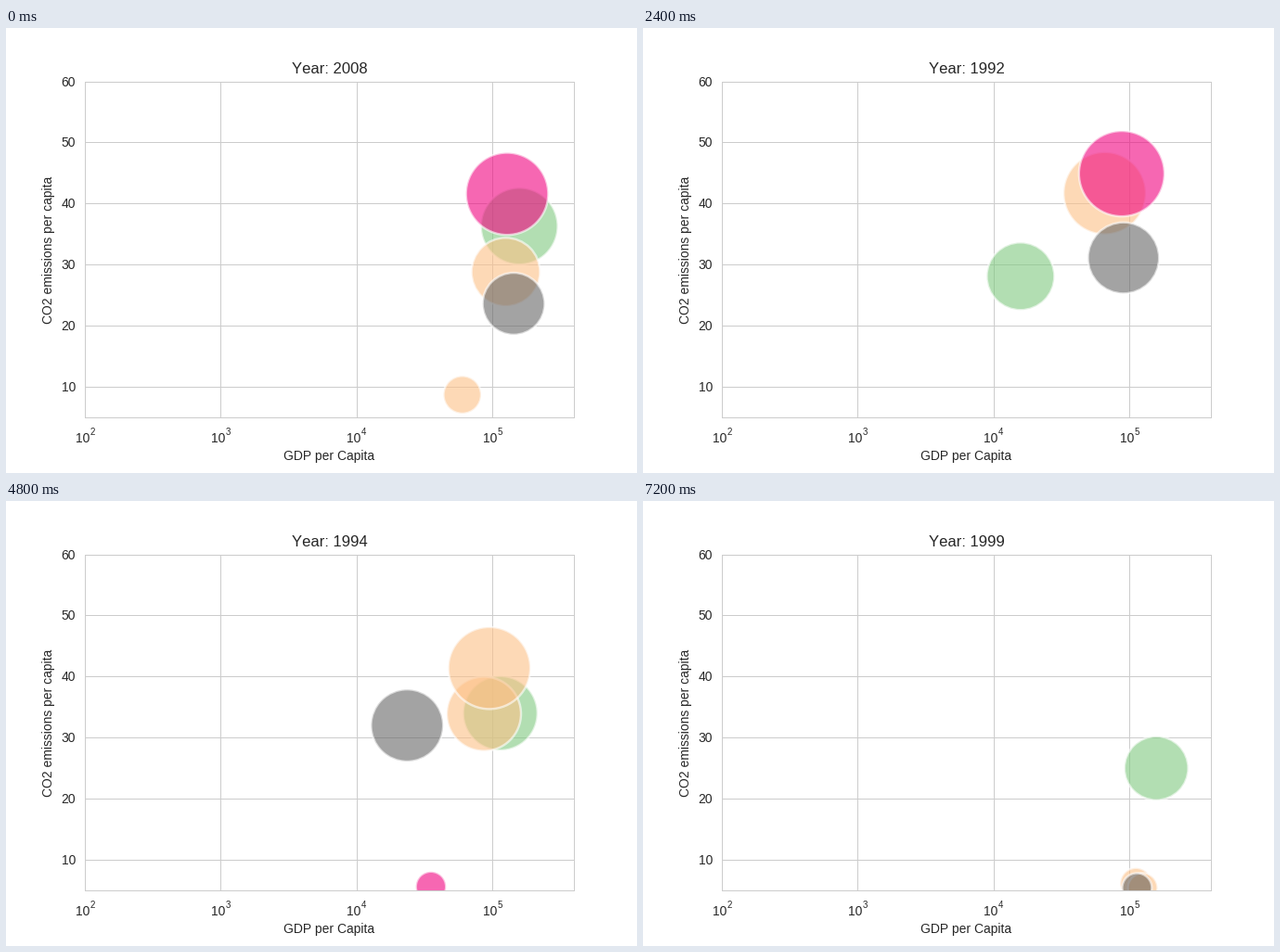
These frames come from a looping animation (680x480 px, 8000 ms). A matplotlib script:

```python
import math

import matplotlib.pyplot as plt
import numpy as np
from matplotlib.animation import FuncAnimation

W, H, DPI = 680, 480, 100
INK, GRID = "#262626", "#cccccc"
LINE = 72 / DPI  # one pixel in points

YEARS = [2008, 2009, *range(1993, 1989, -1), *range(1994, 2000, 2), 1999]

# CO2 per capita at the key steps; zero means the bubble is out of view
STEPS = [0, 2, 3, 4, 6, 7, 9]
CO2 = {
    "green": [36.3, 7.8, 28.1, 14.7, 34.0, 24.2, 25.0],
    "peach": [8.7, 42.0, 41.7, 39.9, 33.9, 37.9, 6.1],
    "apricot": [28.8, 6.2, 0, 23.7, 41.4, 24.9, 5.4],
    "pink": [41.6, 0, 44.9, 40.9, 5.6, 12.6, 0],
    "gray": [23.6, 31.4, 31.1, 16.0, 32.0, 5.5, 5.4],
}
COLORS = ["#7fc97f", "#fdc086", "#fdc086", "#f0027f", "#666666"]


def dip(i, center, width=0.5):
    return math.exp(-(((i - center) / width) ** 2))


def log_gdp(i):
    """GDP exponent per bubble: a base level with slumps."""
    return [
        5.2 - dip(i, 3, 1) - 0.14 * dip(i, 6),
        4.78 + 0.03 * i - 0.3 * dip(i, 2) - 2.44 * dip(i, 4) - 1.15 * dip(i, 7),
        5.1 - 0.93 * dip(i, 7, 0.7),
        5.11 - 1.04 * dip(i, 4.9, 1.4),
        5.16 - 0.8 * dip(i, 5.7, 2.3),
    ]


plt.rcParams["font.family"] = "Liberation Sans"
plt.rcParams["text.kerning_factor"] = 6

fig = plt.figure(figsize=(W / DPI, H / DPI), dpi=DPI, facecolor="white")
ax = fig.add_axes([0.125, 0.125, 0.775, 0.755])
ax.set_xlim(2, math.log10(4e5))
ax.set_ylim(5, 60)
ax.set_xticks(range(2, 6))
ax.set_yticks(range(10, 61, 10))
ax.tick_params(length=0, labelbottom=False, labelleft=False)
ax.set_axisbelow(True)
ax.grid(color=GRID, linewidth=LINE)
for spine in ax.spines.values():
    spine.set(color=GRID, linewidth=LINE)


def put(x, y, text, size=10, **kw):
    """Place text with its baseline at pixel (x, y), y measured downwards."""
    return fig.text(x / W, 1 - y / H, text, fontsize=size, color=INK,
                    va="baseline", **kw)


def to_px(x, y):
    px, py = ax.transData.transform((x, y))
    return px, H - py


for power in range(2, 6):
    x = to_px(power, 5)[0]
    put(x - 10.2, 447, "10", ha="left")
    put(x + 5.2, 439, str(power), 7, ha="left")
for value in range(10, 61, 10):
    put(75, to_px(2, value)[1] + 5, str(value), ha="right")

put(348.3, 466, "GDP per Capita", ha="center")
put(50.5, 239.3, "CO2 emissions per capita", rotation=90, ha="center",
    rotation_mode="anchor")
title = put(348.8, 49, "", 12, ha="center")

bubbles = ax.scatter([0] * 5, [0] * 5, s=[1] * 5, c=COLORS, alpha=0.6,
                     edgecolors="white", linewidths=1.75)


def update(i):
    co2 = [np.interp(i, STEPS, levels) for levels in CO2.values()]
    title.set_text(f"Year: {YEARS[i]}")
    bubbles.set_offsets(np.column_stack([log_gdp(i), co2]))
    bubbles.set_sizes([98 * level for level in co2])
    return title, bubbles


anim = FuncAnimation(fig, update, frames=len(YEARS), interval=800, repeat=True)
plt.show()
```
